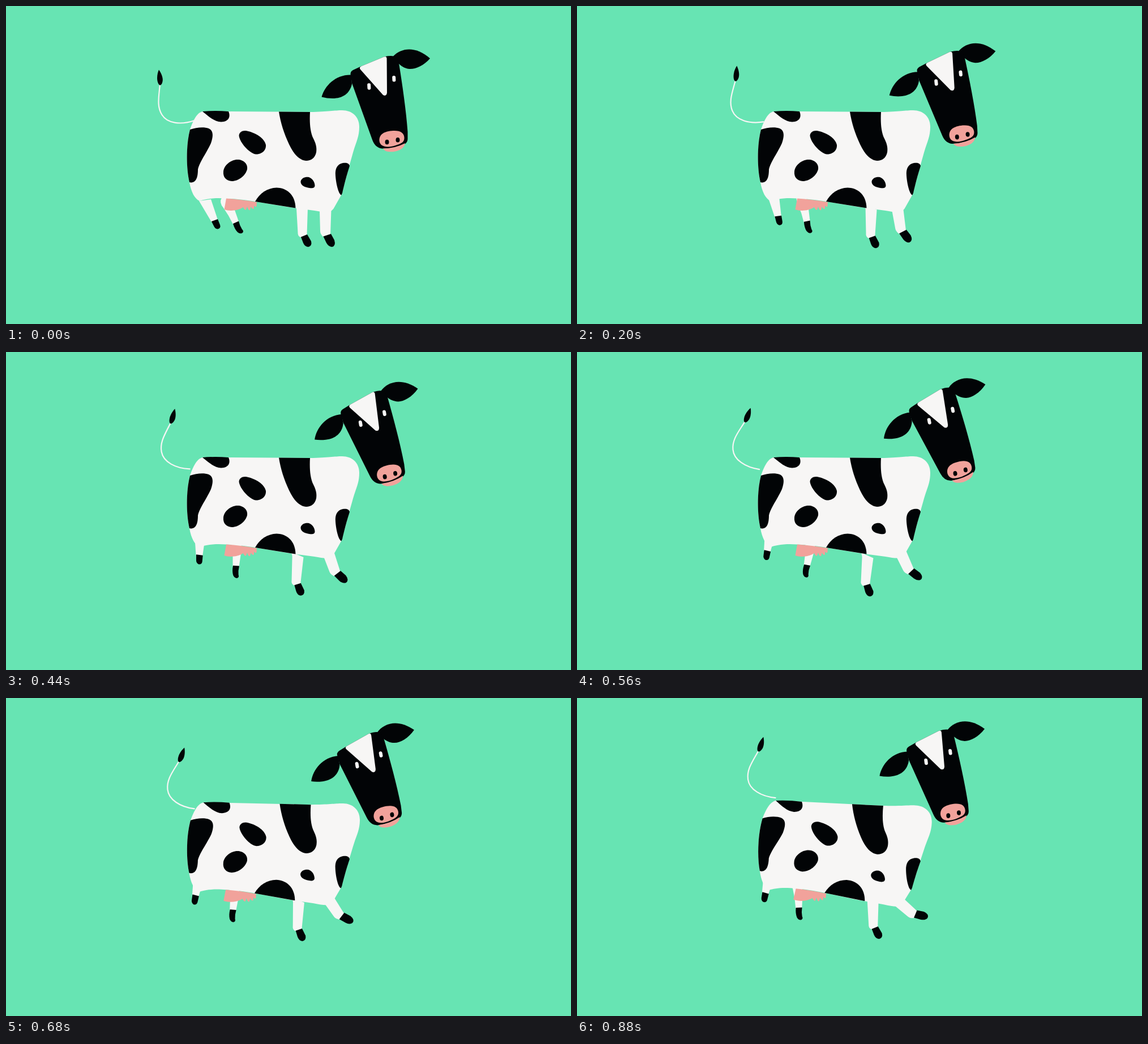
Write an HTML page that moves like this. It is 998 px wide and 561 px high and loops after 0.92 s.

```html
<!DOCTYPE html>
<html lang="en">
<head>
<meta charset="utf-8">
<title>Walking cow</title>
<style>
  html, body { margin: 0; width: 100%; height: 100%; overflow: hidden; background: #67e4b3; }
  svg { display: block; width: 100%; height: 100%; }
  .w { fill: #f7f6f5; }
  .k { fill: #020406; }
  .p { fill: #f1a29b; }
</style>
</head>
<body>
<svg viewBox="0 0 998 561" xmlns="http://www.w3.org/2000/svg">
  <g id="tail">
    <path d="M272 138C270 160 266 177 275.500 192C285 207.500 309 210 333 202" fill="none" stroke="#f7f6f5" stroke-width="2.2" stroke-linecap="round"/>
    <path class="k" d="M270 112.500C274 118 277.500 126 276.700 132C276 137 274 139.700 272 139.700C269 139 267 133 267 127C267 121 268.500 116 270 112.500Z"/>
  </g>
  <g id="hindA">
    <path class="w" d="M341 344L362 341L374 377L363 381Z"/>
    <path class="k" d="M363 380L374 376L378 386Q380 392 374 393.500Q369 393 367 388Z"/>
  </g>
  <g id="hindB">
    <path class="w" d="M381 338Q376 347 384 356Q394 370 401 385L411 380L404 360L394 338Z"/>
    <path class="k" d="M401 384L411 379.500Q413 388 417 394Q420.500 397 418 400Q414 403 409 399Q404 394 401 384Z"/>
  </g>
  <g id="foreA">
    <path class="w" d="M511 350L533 357L531.500 404L520 408Q515 405 515.500 400L513 357Z"/>
    <path class="k" d="M521 407.500L532 403L539 415Q541 423 534 425Q528 425 525 418Z"/>
  </g>
  <g id="foreB">
    <path class="w" d="M552 345L575 345L573 403L560 407Q555 402 555 397L554 361Z"/>
    <path class="k" d="M560.500 406.500L574 402L580 413Q583 423 576 425Q570 425 566 418Z"/>
  </g>
  <g id="body">
    <path class="w" d="M347 186C336 189 330 204 325 218C318 245 318 285 324 311C327 328 333 340 342 344C350 341 366 337.500 390 339.500C430 341 470 351 511 356.500L545 361Q560 364 568 363.500Q577 362 580 355L593 332C600 305 606 283 612 262C618 240 624 232 624 213C624 195 611 184 594 184C580 184 570 186.500 537 187L395 186Z"/>
    <g class="k">
      <path d="M347 186Q370 184 393 186C397 195 394 204 380 204.500C368 204 358 195 347 186Z"/>
      <path d="M325 218C336 214 350 213 358 216C367 220 366 230 362 242C356 256 342 275 339 288C339 300 337 311 327 311.500L324 311C318 285 318 245 325 218Z"/>
      <path d="M411.500 229C412 221 420 218.500 428 221C440 224 456 232 459 245C460 256 450 262 441 261.500C430 260 413 241 411.500 229Z"/>
      <path d="M384 292C385 281 397 271 409 271C420 271 427.500 279 426 288C423 300 410 309 399 309C389 308.500 383 302 384 292Z"/>
      <path d="M482 186.500L537 187C536 205 537 222 543 234C548 244 549 250 548 258C546 268 539 273 530 273C518 272 508 261 500 244C491 225 485 206 482 186.500Z"/>
      <path d="M440 345C448 330 462 321 478 320.500C497 321 511 334 511.500 356.500Z"/>
      <path d="M520.500 309.500C522 303 529 301 535 302C541 304 545 310 545.500 316C546 321 541 322 536 321C529 320 520 317 520.500 309.500Z"/>
      <path d="M607 282C606 277 601 276 595 277C585 279 581 287 582 299C583 315 588 333 592.500 333.500L594 330C600 305 602 298 607 282Z"/>
    </g>
    <path class="p" d="M389 339.500L385.500 359C394 362 408 362 419 355Q421 360 424 359.500L426 354Q428 361 431 360L432.500 354Q435 359 438 357.500L438 352Q441 356 442.500 353L443 346Q415 341 389 339.500Z"/>
  </g>
  <g id="head">
    <g class="k">
      <path d="M557.500 160.500C563 140 583 120.500 610 121.500L611 138C607 155 594 163 577 163Q567 163 557.500 160.500Z"/>
      <path d="M684 88.500C698 74 723 69.500 749 92.500C737 106 722 112 712 111C703 110 697 105 692 100Z"/>
      <path d="M609 123Q607 116 613 113L628 106L668 89.500Q684 86 690 91L694 101C700 138 707 186 709.500 222L709.500 235Q709 241 704 244Q686 252 664 251.500Q652 250 647 236L611 136Z"/>
    </g>
    <path class="w" d="M628 106L668 89.500Q672.500 88 672.600 93L673 153Q672 160 666 157L626 112Q623 108 628 106Z"/>
    <rect class="w" x="638.300" y="136.300" width="6" height="11.400" rx="3" transform="rotate(-3 641 142)"/>
    <rect class="w" x="682.300" y="123" width="6" height="10.600" rx="3" transform="rotate(-3 685 128)"/>
    <path class="p" d="M659.500 238C659 226 668 221 684 220C697 219.500 703 224 703.500 232C704 240 698 243 688 246C676 250 661 250 659.500 238Z"/>
    <ellipse class="k" cx="673" cy="240" rx="3.500" ry="4.300"/>
    <ellipse class="k" cx="692" cy="236.300" rx="3.500" ry="4.300"/>
    <path class="p" d="M666 251.500Q688 251 705 242Q703 254 685 257Q669 258.500 666 251.500Z"/>
  </g>
</svg>
<script>
  const LOOP = 920, STEP = 40, TURN = 560, END = 880;

  // Pivot, then [dx, dy, degrees] at TURN and at END; every part starts at rest.
  const parts = {
    tail:  { at: [317, 182],     turn: [0, 0, 27],            end: [27, -30.7, 24] },
    hindA: { at: [397.3, 311.8], turn: [0, 0, 34],            end: [-2, -4.6, 36] },
    hindB: { at: [406, 382],     turn: [0.5, -6, 35],         end: [-14, -12, 22] },
    foreA: { at: [526.5, 405],   turn: [-14.5, 5.5, 6],       end: [-0.3, 0, 0] },
    foreB: { at: [567, 404],     turn: [23, -17.5, -25],      end: [30.5, -23, -49] },
    body:  { at: [466, 281],     turn: [0, 0, 0],             end: [0, 0, 2.41] },
    head:  { at: [653.5, 126.5], turn: [-21.5, -21.5, -8.5],  end: [-26, -30.5, -4.5] }
  };
  const rest = [0, 0, 0];
  const mix = (a, b, k) => a.map((v, i) => v + (b[i] - v) * k);

  function draw(t) {
    for (const id in parts) {
      const { at: [x, y], turn, end } = parts[id];
      const [dx, dy, deg] = t <= TURN
        ? mix(rest, turn, t / TURN)
        : mix(turn, end, (t - TURN) / (END - TURN));
      document.getElementById(id).setAttribute("transform",
        `translate(${dx} ${dy}) rotate(${deg} ${x} ${y})`);
    }
  }

  const start = performance.now();
  function tick() {
    const t = (performance.now() - start) % LOOP;
    draw(Math.floor(t / STEP) * STEP);
    requestAnimationFrame(tick);
  }
  tick();
</script>
</body>
</html>
```
